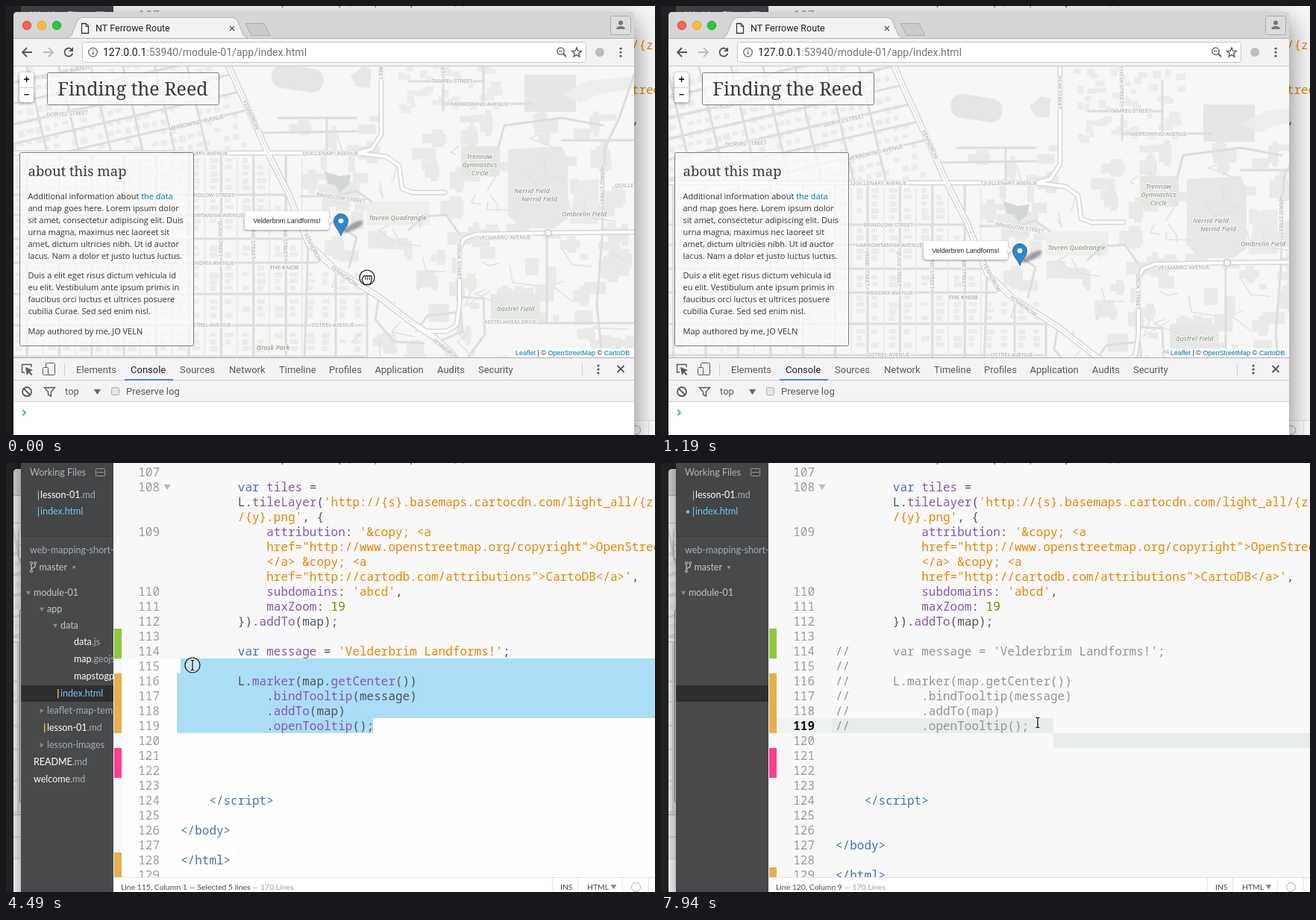
Animation, 870 px wide and 575 px high, one loop 8 s. Source, as an HTML page with a canvas:

```html
<!DOCTYPE html>
<html lang="en">
<head>
<meta charset="utf-8">
<title>Map and editor</title>
<style>
html, body { margin: 0; width: 100%; height: 100%; overflow: hidden; background: #222; }
canvas { display: block; }
</style>
</head>
<body>
<canvas id="stage" width="870" height="575"></canvas>
<script>
const LOOP = 8000;
const MONO = '"Noto Sans Mono", monospace', UI = 'Roboto, sans-serif', SIDE = 'Lato, sans-serif';
const BODY = '"Open Sans", sans-serif', SERIF = '"Noto Serif", serif', ARIAL = '"Liberation Sans", sans-serif';
const stage = document.getElementById('stage').getContext('2d');
let g = stage;

// ---------- drawing helpers ----------
function rect(x, y, w, h, color) { g.fillStyle = color; g.fillRect(x, y, w, h); }
function rounded(x, y, w, h, r, fill, stroke) {
  g.beginPath(); g.roundRect(x, y, w, h, r); paint(fill, stroke);
}
function paint(fill, stroke, width = 1) {
  if (fill) { g.fillStyle = fill; g.fill(); }
  if (stroke) { g.strokeStyle = stroke; g.lineWidth = width; g.stroke(); }
}
function circle(x, y, r, fill, stroke, width) {
  g.beginPath(); g.arc(x, y, r, 0, 7); paint(fill, stroke, width);
}
function path(p, close) {
  g.beginPath();
  for (let i = 0; i < p.length; i += 2) g.lineTo(p[i], p[i + 1]);
  if (close) g.closePath();
}
function line(p, color, width = 1) { path(p); paint(null, color, width); }
function poly(p, fill, stroke, width) { path(p, true); paint(fill, stroke, width); }
function text(s, x, y, font, color, align = 'left') {
  g.font = font; g.fillStyle = color; g.textAlign = align;
  g.fillText(s, x, y);
}
function run(parts, x, y, font) {
  for (const [s, color] of parts) { text(s, x, y, font, color); x += g.measureText(s).width; }
}
function triangle(x, y, r, color, right) {
  poly(right ? [x - r * .7, y - r, x + r * .8, y, x - r * .7, y + r]
             : [x - r, y - r * .7, x + r, y - r * .7, x, y + r * .9], color);
}
function shadow(color, blur, dy = 0) { g.shadowColor = color; g.shadowBlur = blur; g.shadowOffsetY = dy; }
function noShadow() { shadow('transparent', 0); }
function clipped(x, y, w, h, draw) {
  g.save(); g.beginPath(); g.rect(x, y, w, h); g.clip(); draw(); g.restore();
}
const mix = (a, b, k) => a + (b - a) * k;
const ease = k => k * k * (3 - 2 * k);

// ---------- map ----------
const DIAGONAL = [276, 30, 297, 78, 328, 145, 350, 195, 378, 250, 405, 318, 440, 352, 500, 390, 545, 425, 575, 445, 615, 482];
const diagX = y => 296 + (y - 78) * .455;
const MAJOR = [
  DIAGONAL,
  [-50, 197, 470, 197, 490, 192, 503, 172, 503, 30],
  [470, 197, 510, 202, 527, 214, 531, 245, 545, 250, 588, 250],
  [842, 303, 735, 304, 630, 306, 614, 312, 608, 325, 608, 400, 604, 428, 590, 436, 560, 436]
];
const MINOR = [
  [365, 150, 470, 150], [340, 170, 470, 168], [430, 150, 430, 197],
  [586, 30, 586, 140], [540, 101, 640, 101], [586, 131, 705, 131], [640, 60, 640, 131],
  [842, 92, 822, 150, 803, 190, 799, 310, 792, 400, 800, 480], [745, 180, 842, 180],
  [660, 190, 668, 160, 745, 150, 800, 160], [608, 306, 590, 280, 560, 282, 540, 300],
  [395, 255, 440, 255, 470, 248, 490, 262], [440, 290, 470, 310, 460, 350],
  [608, 390, 640, 392, 642, 440, 620, 470], [640, 425, 842, 425], [725, 310, 725, 425],
  [550, 436, 565, 415, 610, 410, 612, 436, 580, 450], [500, 390, 495, 420, 520, 450, 560, 452],
  [405, 318, 400, 480], [442, 355, 442, 480], [484, 385, 484, 480]
];
const STREETS = [
  ['TOLANDRE AVENUE', 80, 88, -13], ['DORVEL STREET', 82, 144, -3], ['DORVEL STREET', 213, 113, -13],
  ['MERROWIND AVENUE', 255, 156, -13], ['QUILLENARY AVENUE', 435, 200, 0], ['QUILLENARY AVENUE', 260, 200, 0],
  ['BRINDLOW STREET', 273, 256, 0], ['BRINDLOW STREET', 449, 257, 8], ['HARROWTANNIA AVENUE', 274, 283, 0],
  ['WENDRIX AVENUE', 274, 347, 0], ['OSTREL AVENUE', 273, 430, 0], ['OSTREL AVENUE', 438, 430, 0],
  ['VELMARRO AVENUE', 669, 310, -1], ['KESTELHOLM DRIVE', 676, 426, 0], ['TAMREL STREET', 598, 103, 0],
  ['MERROWIND AVENUE', 635, 134, 0], ['FENNDROW', 329, 146, 65], ['FENNDROW', 412, 324, 62],
  ['FENNDROW', 454, 362, 36], ['FENNDROW', 590, 460, 38], ['VEMB STREET', 245, 312, 90],
  ['QUOL STREET', 288, 312, 90], ['WUND STREET', 332, 314, 90], ['SNEB STREET', 375, 314, 90],
  ['PLIM STREET', 503, 76, 90], ['DROK STREET', 608, 343, 90], ['HESK STREET', 586, 68, 90],
  ['NERRID STREET', 800, 240, 90], ['QUILLENARY AVE', 846, 243, 0]
];
const PLACES = [
  ['Tavren Quadrangle', 525, 287], ['Trennow', 635, 205], ['Gymnastics', 635, 216], ['Circle', 635, 227],
  ['Nerrid Field', 705, 251], ['Nerrid Field', 715, 262], ['Ombrelin Field', 775, 282],
  ['Gastrel Field', 683, 409], ['Grosk Park', 358, 461]
];

function buildMap() {
  const c = document.createElement('canvas');
  c.width = 910; c.height = 455;
  g = c.getContext('2d');
  g.translate(50, -30);
  g.lineJoin = g.lineCap = 'round';
  let seed = 11;
  const rnd = () => (seed = (seed * 16807) % 2147483647) / 2147483647;
  const HOUSE = '#ebebea', ROAD = '#dcdede';
  rect(-50, 30, 910, 455, '#f6f6f4');

  // houses along the regular blocks
  const vx = i => -15.4 + 43.4 * i, rows = [197, 253, 280, 312, 344, 386, 428, 470];
  for (let i = 0; i < 12; i++)
    for (let y = 204; y < 484; y += 9)
      for (const side of [-15, 5]) {
        const x = vx(i) + side, w = 7 + rnd() * 5, h = 5 + rnd() * 3;
        if (rows.some(r => Math.abs(r - y - 3) < 7) || (y < 350 && x > diagX(y) - 18) || rnd() < .12) continue;
        rect(x, y, w, h, HOUSE);
      }
  // tilted quarter north of the avenue
  clipped(-50, 30, 900, 164, () => {
    for (let c = 60; c < 270; c += 14)
      for (let x = -45; x < 320; x += 12) {
        const y = c - .23 * x;
        if (x > diagX(y) - 18 || rnd() < .2) continue;
        g.save(); g.translate(x, y); g.rotate(-.22);
        rect(0, 0, 6 + rnd() * 4, 5 + rnd() * 4, HOUSE);
        g.restore();
      }
    for (const c of [77, 105, 133, 161, 187, 214]) {
      const end = (260.5 + .455 * c) / 1.105;
      line([-50, c + 11.5, end, c - .23 * end], ROAD, 3);
    }
    for (let x = -70; x < 270; x += 43) line([x, 30, x + 39, 197], ROAD, 3);
  });
  // larger buildings of the eastern part
  for (let i = 0; i < 150; i++) {
    const x = 350 + rnd() * 470, y = 140 + rnd() * 330, w = 8 + rnd() * 24, h = 7 + rnd() * 18;
    if (x < diagX(y) + 20 || (x > 480 && x < 575 && y > 262 && y < 300) || (x < 545 && y > 350 && y < 440)) continue;
    rect(x, y, w, h, '#e9e9e8');
    if (rnd() < .5) rect(x + w * .4, y - 6, w * .5, h + 11, '#e9e9e8');
  }
  for (let i = 0; i < 60; i++) rect(520 + rnd() * 140, 40 + rnd() * 95, 6 + rnd() * 8, 6 + rnd() * 5, HOUSE);
  // sports grounds and pond
  g.save(); g.translate(391, 97); g.rotate(.15); rounded(-35, -16, 70, 32, 15, '#e4e5e4'); g.restore();
  poly([462, 94, 478, 81, 490, 84, 488, 110, 470, 108], '#e6e7e6');
  rect(695, 92, 69, 50, '#e5e6e5');
  poly([673, 192, 745, 188, 753, 205, 753, 285, 735, 298, 690, 298, 673, 280], '#e6e7e6');
  poly([765, 235, 795, 232, 794, 292, 755, 292], '#eaebea');
  rect(650, 386, 66, 34, '#e5e8e5');
  rect(610, 188, 52, 40, '#e6e6e5');
  rect(484, 262, 84, 32, '#eeefed');
  poly([427, 222, 446, 228, 462, 226, 459, 240, 447, 250, 441, 240, 432, 238], '#d3d7d8');
  poly([745, 118, 780, 100, 842, 95, 842, 110, 790, 120, 770, 130], '#eceded');

  for (const r of rows.slice(1)) line([-50, r, r < 345 ? diagX(r) : 480, r], ROAD, 3);
  for (let i = 0; i < 10; i++) {
    line([vx(i), 197, vx(i), 485], ROAD, 3.4);
    line([vx(i) + 21.5, 204, vx(i) + 21.5, 485], '#e6e7e7', 1.4);
  }
  for (const p of MINOR) line(p, ROAD, 3);
  for (let i = 0; i < 34; i++) {
    const x = 440 + rnd() * 370, y = 150 + rnd() * 300;
    line([x, y, x + rnd() * 30 - 15, y + rnd() * 24, x + rnd() * 50 - 10, y + rnd() * 30], '#e0e2e2', 1.6);
  }
  for (const p of MAJOR) line(p, '#d5d8d8', p === DIAGONAL ? 9 : 7);
  for (const p of MAJOR) line(p, '#fbfbfa', p === DIAGONAL ? 6 : 4);
  line(DIAGONAL.slice(0, 18), '#d8dada', 1);
  circle(727, 304, 4.5, '#f8f8f7', '#d0d3d3', 2);

  const label = (s, x, y, deg, font, color) => {
    g.save(); g.translate(x, y); g.rotate(deg * Math.PI / 180);
    g.font = font; g.textAlign = 'center'; g.strokeStyle = '#f6f6f4'; g.lineWidth = 2.5;
    g.strokeText(s, 0, deg ? 3 : 0);
    text(s, 0, deg ? 3 : 0, font, color, 'center');
    g.restore();
  };
  for (const [s, x, y, deg] of STREETS) label(s, x, y, deg, '7.5px ' + BODY, '#a2a4a4');
  for (const [s, x, y] of PLACES) label(s, x, y, 0, 'italic 600 9px ' + BODY, '#91a497');
  label('THE KNOB', 373, 353, 0, '8px ' + BODY, '#87919a');
  g = stage;
  return c;
}
const mapImage = buildMap();

// ---------- browser ----------
function panStep(t) { return t < 150 ? -1 : Math.min(7, Math.floor((t - 150) / 148.5)); }
function panAt(k) {
  if (k < 2) return [10 * (k + 1), Math.round(13.5 * (k + 1))];
  const done = 1 - Math.pow(.5, k - 1);
  return [20 + Math.round(12 * done), 27 + Math.round(13 * done)];
}

function drawMarker(x, y) {
  g.save();
  g.translate(x + 1, y); g.transform(1, 0, -.75, .55, 0, 0);
  g.filter = 'blur(1.5px)';
  g.beginPath(); g.ellipse(0, -20, 8, 15, 0, 0, 7); paint('rgba(0,0,0,.33)');
  g.restore();
  const tip = y + 1, cy = y - 19;
  g.beginPath();
  g.moveTo(x, tip);
  g.bezierCurveTo(x - 3, tip - 9, x - 9.5, cy + 8, x - 9.5, cy);
  g.arc(x, cy, 9.5, Math.PI, 0);
  g.bezierCurveTo(x + 9.5, cy + 8, x + 3, tip - 9, x, tip);
  paint('#2f86c8', '#2a6fa5');
  circle(x, cy, 3.3, '#fff');
}
function drawTooltip(x, y) {
  shadow('rgba(0,0,0,.4)', 3, 1);
  rounded(x, y, 113, 25, 3, '#fff');
  poly([x + 113, y + 8, x + 118, y + 12.5, x + 113, y + 17], '#fff');
  noShadow();
  text('Velderbrim Landforms!', x + 56.5, y + 16, '9px ' + ARIAL, '#222', 'center');
}
function drawHand(x, y, pressed) {
  if (pressed) circle(x, y, 10, 'rgba(255,255,255,.55)', '#111', 1.2);
  g.beginPath();
  g.moveTo(x - 4, y + 9); g.lineTo(x - 7, y + 3); g.lineTo(x - 5, y - 1);
  for (let i = 0; i < 4; i++) g.arc(x - 3.5 + i * 2.8, y - 1, 1.4, Math.PI, 0);
  g.lineTo(x + 6, y + 4); g.lineTo(x + 4, y + 9); g.closePath();
  paint('#fff', '#111', 1.2);
  for (let i = 0; i < 3; i++) line([x - 2 + i * 2.8, y, x - 2 + i * 2.8, y + 3], '#111', 1);
}

const ABOUT = [
  [275, 'and map goes here. Lorem ipsum dolor'], [291, 'sit amet, consectetur adipiscing elit. Duis'],
  [307, 'urna magna, maximus nec laoreet sit'], [323, 'amet, dictum ultricies nibh. Ut id auctor'],
  [339, 'lacus. Nam a dolor et justo luctus luctus.'], [365, 'Duis a elit eget risus dictum vehicula id'],
  [381, 'eu elit. Vestibulum ante ipsum primis in'], [397, 'faucibus orci luctus et ultrices posuere'],
  [413, 'cubilia Curae. Sed sed enim nisl.'], [440, 'Map authored by me, JO VELN']
];

function drawPage(t) {
  const k = panStep(t), [dx, dy] = panAt(k);
  g.drawImage(mapImage, dx - 50, dy + 30);
  drawMarker(449 + dx, 307 + dy);
  drawTooltip(320 + dx, 275 + dy);

  shadow('rgba(0,0,0,.45)', 4, 1);
  rounded(18, 89, 19, 40, 3, '#fff');
  noShadow();
  rect(18, 109, 19, 1, '#ccc');
  text('+', 27.5, 103, 'bold 14px ' + ARIAL, '#111', 'center');
  text('−', 27.5, 123, 'bold 13px ' + ARIAL, '#111', 'center');

  rounded(55.5, 89.5, 230, 43, 2, 'rgba(250,250,250,.75)', '#7d7d7d');
  text('Finding the Reed', 170, 120, '25px ' + SERIF, '#3a3a3a', 'center');
  rounded(18.5, 196.5, 233, 259, 2, 'rgba(250,250,250,.75)', '#7d7d7d');
  text('about this map', 29.5, 228, '18.5px ' + SERIF, '#3a3a3a');
  const font = '11px ' + BODY;
  run([['Additional information about ', '#333'], ['the data', '#0a72bd']], 29.5, 259, font);
  for (const [y, s] of ABOUT) text(s, 29.5, y, font, '#333');

  rect(681, 459, 161, 12, 'rgba(255,255,255,.75)');
  const link = '#0078a8';
  run([['Leaflet', link], [' | © ', '#333'], ['OpenStreetMap', link], [' © ', '#333'], ['CartoDB', link]],
    683, 468, '9px ' + ARIAL);
  if (k < 5) {
    const [hx, hy] = panAt(Math.min(k, 1));
    drawHand(484 + hx, 364 + hy, k < 2);
  }
}

function drawChrome() {
  rect(10, 8, 832, 36, '#d5d5d5');
  [['#ff5f57', '#e14640'], ['#ffbd2e', '#dfa023'], ['#28c940', '#1dad2b']].forEach(([fill, edge], i) =>
    circle(28 + 20 * i, 26, 5.7, fill, edge));
  poly([82, 43.5, 88, 39, 96, 19, 101, 15.5, 305, 15.5, 310, 19, 318, 39, 324, 43.5], '#f2f2f2', '#b3b3b3');
  rect(10, 43, 72, 1, '#b3b3b3'); rect(324, 43, 518, 1, '#b3b3b3');
  rect(10, 44, 832, 37, '#f2f2f2');
  rect(10, 80, 832, 1, '#c8c8c8');
  poly([321, 23.5, 346, 23.5, 354, 39.5, 329, 39.5], '#cbcbcb', '#aaa');
  poly([101.5, 23.5, 107, 23.5, 110.5, 27, 110.5, 36.5, 101.5, 36.5], '#fff', '#333', 1.3);
  line([107, 23.5, 107, 27.5, 110.5, 27.5], '#333');
  text('NT Ferrowe Route', 120, 34, '12.5px ' + UI, '#222');
  line([300, 27, 306, 33], '#555', 1.3); line([306, 27, 300, 33], '#555', 1.3);
  rounded(810.5, 13.5, 27, 25, 3, '#dcdcdc', '#aaa');
  circle(824, 22.5, 3, '#777');
  g.beginPath(); g.ellipse(824, 31, 6, 4, 0, Math.PI, 0); paint('#777');

  line([35, 62, 22, 62], '#555', 1.8); line([28, 56, 22, 62, 28, 68], '#555', 1.8);
  line([50, 62, 62, 62], '#bbb', 1.8); line([57, 56, 63, 62, 57, 68], '#bbb', 1.8);
  g.beginPath(); g.arc(84, 62, 5.5, .3, 5.5); paint(null, '#555', 1.8);
  poly([90, 55, 90, 61, 84, 61], '#555');
  rounded(102.5, 48.5, 675, 27, 3, '#fff', '#c6c6c6');
  circle(116.5, 62, 5.8, null, '#666', 1.3);
  rect(116, 61, 1.4, 4, '#666'); rect(116, 58.5, 1.4, 1.4, '#666');
  run([['127.0.0.1', '#222'], [':53940/module-01/app/index.html', '#757575']], 130, 67, '14px ' + UI);
  circle(743.5, 60.5, 4.6, null, '#555', 1.4); line([747, 64, 751, 68], '#555', 1.8);
  line([741, 60.5, 746, 60.5], '#555');
  const star = [];
  for (let i = 0; i < 10; i++) {
    const r = i % 2 ? 2.9 : 6.8, a = i * Math.PI / 5;
    star.push(765 + r * Math.sin(a), 62.5 - r * Math.cos(a));
  }
  poly(star, null, '#555', 1.3);
  circle(796, 62, 6, '#bdbdbd');
  for (const y of [57, 62, 67]) circle(824, y, 1.6, '#555');
}

function drawDevtools() {
  rect(10, 471, 832, 104, '#f3f3f3');
  rect(10, 471, 832, 1, '#b0b0b0');
  rect(10, 501, 832, 1, '#ccc');
  rect(10, 531, 832, 44, '#fff');
  rect(10, 530, 832, 1, '#d5d5d5');
  line([25, 491, 21.5, 491, 21.5, 480.5, 34, 480.5, 34, 484], '#5a5a5a', 1.4);
  poly([26, 484, 36, 488, 32, 490, 35.5, 494, 34, 495, 30.5, 491.5, 28, 495], '#5a5a5a');
  rounded(53.5, 478.5, 12, 16, 1, null, '#5a5a5a');
  rounded(49.5, 484.5, 7, 10, 1, '#f3f3f3', '#5a5a5a');
  rect(78, 479, 1, 16, '#ccc'); rect(772, 479, 1, 16, '#ccc');
  [['Elements', 94], ['Console', 167], ['Sources', 233], ['Network', 299], ['Timeline', 366], ['Profiles', 433],
    ['Application', 494.5], ['Audits', 578], ['Security', 633]].forEach(([s, x]) =>
    text(s, x, 492, '13px ' + UI, s === 'Console' ? '#222' : '#5a5a5a'));
  rect(159, 500, 65, 2, '#4d83e6');
  for (const y of [482, 487, 492]) circle(794, y, 1.6, '#555');
  line([819.5, 482, 828.5, 491], '#555', 1.8); line([828.5, 482, 819.5, 491], '#555', 1.8);
  circle(28, 517, 6, null, '#5a5a5a', 1.8); line([24, 513, 32, 521], '#5a5a5a', 1.8);
  poly([51.5, 511.5, 65.5, 511.5, 60.5, 517, 60.5, 523, 56.5, 521, 56.5, 517], null, '#5a5a5a', 1.4);
  text('top', 79, 521, '13px ' + UI, '#5a5a5a');
  triangle(122.5, 517, 4.5, '#666');
  rounded(141.5, 511.5, 10, 10, 2, '#e6e6e6', '#aaa');
  text('Preserve log', 161, 521, '13px ' + UI, '#5a5a5a');
  line([22.5, 541.5, 26, 545, 22.5, 548.5], '#3f80ea', 1.6);
}

function drawBrowser(t, front) {
  if (front) shadow('rgba(0,0,0,.5)', 36, 12);
  rounded(10, 8, 832, 590, [5, 5, 0, 0], '#d5d5d5');
  noShadow();
  g.save(); g.beginPath(); g.roundRect(10, 8, 832, 590, [5, 5, 0, 0]); g.clip();
  drawChrome();
  clipped(10, 81, 832, 390, () => drawPage(t));
  drawDevtools();
  g.restore();
}

// ---------- editor ----------
const INK = { t: '#535353', b: '#446fbd', p: '#8757ad', o: '#e88501', n: '#6d8600' };
const I8 = ' '.repeat(8), I12 = ' '.repeat(12);
const CW = 9.6, LEFT = 234, COMMENT = '#949494';
// ~x switches to colour x; the first item is the line number
const CODE = [
  [106, I8 + "~bvar ~pmap ~t= L.~pmap~t(~o'map'~t, options);"], [107, ''], [108, I8 + '~bvar ~ptiles ~t='],
  [0, I8 + "~tL.~ptileLayer~t(~o'http://{s}.basemaps.cartocdn.com/light_all/{z}/{x}"], [0, I8 + "~o/{y}.png'~t, {"],
  [109, I12 + "~pattribution~t: ~o'&copy; <a"], [0, I12 + '~ohref="http://www.openstreetmap.org/copyright">OpenStreetMap'],
  [0, I12 + '~o</a> &copy; <a'], [0, I12 + "~ohref=\"http://cartodb.com/attributions\">CartoDB</a>'~t,"],
  [110, I12 + "~psubdomains~t: ~o'abcd'~t,"], [111, I12 + '~pmaxZoom~t: ~n19'], [112, I8 + '~t}).~paddTo~t(map);'], [113, ''],
  [114, I8 + "~bvar ~pmessage ~t= ~o'Velderbrim Landforms!'~t;"], [115, ''], [116, I8 + '~tL.~pmarker~t(map.~pgetCenter~t())'],
  [117, I12 + '~t.~pbindTooltip~t(message)'], [118, I12 + '~t.~paddTo~t(map)'], [119, I12 + '~t.~popenTooltip~t();'],
  [120, ''], [121, ''], [122, ''], [123, ''], [124, '    ~b</script' + '>'], [125, ''], [126, '~b</body>'], [127, ''],
  [128, '~b</html>'], [129, '']
];
const rowTop = n => 262 + (n - 115) * 20;

function codeRow(src, y, commented) {
  if (commented) {
    const plain = '//' + src.replace(/~./g, '').slice(2);
    return text(plain, LEFT, y, '500 16px ' + MONO, COMMENT);
  }
  let col = 0;
  for (const part of src.split('~')) {
    const color = INK[part[0]], s = color ? part.slice(1) : part;
    text(s, LEFT + col * CW, y, '500 16px ' + MONO, color || INK.t);
    col += s.length;
  }
}

// everything the editor shows at a given time
function editorState(t) {
  const s = { commented: t >= 5840, added: t >= 7940, status: 'Line 119, Column 28', active: t >= 2240 };
  const progress = (from, steps) => ease(Math.min(1, (Math.floor((t - from + 1) / 149.5) + 1) / steps));
  if (t >= 2240 && t < 3590) {
    s.caret = (t - 2240) % 1050 < 600 || t >= 3290;
    if (t >= 2540) {
      const k = progress(2540, 7);
      s.mouse = [mix(880, 499, k), mix(425, 352, k), 'beam'];
    }
  } else if (t >= 3590 && t < 4640) {
    const k = progress(3590, 7), x = mix(492, 250, k), y = mix(352, 271, k);
    const head = Math.max(115, 115 + Math.floor((y - 262) / 20));
    const col = head === 115 ? 0 : Math.round((Math.min(x, 492) - LEFT) / CW);
    s.mouse = [x, y, 'beam', true];
    s.select = [head, LEFT + col * CW];
    s.status = `Line ${head}, Column ${col + 1}`;
    s.picked = head < 119 ? ` — Selected ${120 - head} lines` : ` — Selected ${Math.max(1, 27 - col)} columns`;
    s.white = 262;
  } else if (t >= 4640 && t < 7190) {
    s.select = [114, 229];
    s.status = 'Line 114, Column 1';
    s.picked = ' — Selected 6 lines';
    s.fold = t >= 5090;
    s.white = t < 6590 ? 262 : 326;
    if (t < 4790) s.mouse = [237, 256, 'beam', true];
    else if (t < 5090) s.mouse = [191, 250, 'arrow'];
    else if (t >= 6590) {
      const k = progress(6590, 4);
      s.mouse = [mix(215, 505, k), mix(262, 348, k), 'beam'];
    }
  } else if (t >= 7190) {
    s.mouse = [505, 348, 'beam', t < 7340];
    s.caret = t < 7640;
    s.split = true;
    if (s.added) s.status = 'Line 120, Column 9';
  }
  s.active = s.active && !s.select;
  return s;
}

function drawMouse([x, y, kind, pressed]) {
  x = Math.round(x); y = Math.round(y);
  if (pressed) circle(x, y, 10, 'rgba(255,255,255,.3)', '#111', 1.2);
  if (kind === 'arrow')
    return poly([x, y, x, y + 15, x + 3.5, y + 12, x + 6, y + 17, x + 8, y + 16, x + 6, y + 11, x + 10.5, y + 11], '#111', '#fff');
  const beam = [x - 2.5, y - 7, x, y - 6, x, y + 6, x - 2.5, y + 7, x, y + 6, x + 2.5, y + 7, x, y + 6, x, y - 6, x + 2.5, y - 7];
  line(beam, 'rgba(255,255,255,.8)', 3);
  line(beam, '#111', 1.3);
}

function drawCode(s) {
  rect(144, 0, 726, 575, '#f8f8f8');
  if (s.white) rect(155, s.white, 715, 555 - s.white, '#fefefe');
  if (s.active) {
    rect(155, 342, 74, 20, '#eff2f2');
    rect(229, 342, s.split ? 297 : 641, 20, '#e7ecec');
    if (s.split) rect(526, 362, 344, 20, '#e7ecec');
  }
  if (s.select) {
    const [head, x] = s.select;
    for (let n = head; n <= 119; n++) {
      const from = n === head ? x : 229;
      rect(from, rowTop(n), (n === 119 ? 492 : 870) - from, 20, '#abddf7');
    }
  }
  [['#8dc93d', 222, 40], ['#e5b04f', 282, 80], ['#ff3f8e', 382, 40],
    ['#e5b04f', s.added ? 542 : 522, 40]].forEach(([c, y, h]) => rect(145, y, 10, h, c));
  CODE.forEach(([n, src], i) => {
    const y = 20 * i - 2, bold = s.active && n === 119;
    if (n) text(n, 206, y, (bold ? '700' : '500') + ' 16px ' + MONO, bold ? '#111' : '#9b9b9b', 'right');
    codeRow(src, s.added && n >= 126 ? y + 20 : y, s.commented && n >= 114 && n <= 119);
  });
  triangle(216, 32, 4.5, '#b9b9b9');
  if (s.fold) triangle(216, 252, 4.5, '#b9b9b9');
  if (s.caret) rect(492, 342, 1, 20, '#000');
}

function drawStatus(s) {
  rect(144, 555, 726, 20, '#fff');
  rect(144, 555, 726, 1, '#e0e0e0');
  const font = '10.4px ' + SIDE;
  run([[s.status + (s.picked || ''), '#454545'], [' — 170 Lines', '#a0a0a0']], 154, 572, font);
  for (const x of [732, 766, 826, 861]) rect(x, 556, 1, 19, '#e4e4e4');
  text('INS', 743, 572, font, '#454545');
  text('HTML', 779, 572, font, '#454545');
  triangle(814.5, 568, 4, '#888');
  circle(844.5, 568.5, 6, null, '#aaa');
}

function drawSidebar(s) {
  const font = '12.5px ' + SIDE, white = '#fff', dim = '#aaadaf', blue = '#78c4f0', bar = '#e5b04f';
  const file = (name, ext, x, y) => run([[name, white], [ext, dim]], x, y + 4, font);
  rect(20, 0, 124, 575, '#47494b');
  rect(20, 0, 124, 98, '#434547');
  rect(20, 98, 124, 1, '#393b3c');
  text('Working Files', 32, 17, font, '#b4b6b8');
  rounded(120.5, 7.5, 12, 10, 1, null, '#999');
  line([122, 12.5, 131, 12.5], '#999');
  rect(43, 37, 1, 13, '#b9b9b9'); rect(43, 59, 1, 13, blue);
  file('lesson-01', '.md', 46, 43);
  text('index.html', 46, 69, font, blue);
  if (s.commented) circle(36, 65.5, 2.3, '#aaa');
  text('web-mapping-short-course', 32, 121, font, dim);
  line([34, 135, 34, 144], '#c4c6c7', 1.2); line([34, 142, 39, 139, 39, 135], '#c4c6c7', 1.2);
  for (const [x, y] of [[34, 134], [34, 145], [39, 134]]) circle(x, y, 1.6, '#47494b', '#c4c6c7');
  text('master', 44.5, 144, font, '#c4c6c7');
  triangle(91, 140, 2.5, '#999');
  triangle(30, 174, 3.2, '#858789');
  text('module-01', 37, 178, font, '#c4c6c7');
  rect(20, 298, 124, 22, '#2d2e30');
  if (s.added) return;
  triangle(48, 196, 3.2, '#858789'); text('app', 55, 200, font, '#c4c6c7');
  triangle(66, 218, 3.2, '#858789'); text('data', 73, 222, font, '#c4c6c7');
  file('data', '.js', 91, 240);
  file('map', '.geojson', 91, 263);
  file('mapstogpx', '.js', 91, 286);
  rect(69, 303, 1.5, 12, bar);
  text('index.html', 73, 313, font, blue);
  triangle(48, 332, 3.2, '#858789', true); text('leaflet-map-template', 55, 336, font, dim);
  rect(51, 349, 1.5, 12, bar);
  file('lesson-01', '.md', 55, 355);
  triangle(48, 378, 3.2, '#858789', true); text('lesson-images', 55, 382, font, dim);
  file('README', '.md', 37, 401);
  file('welcome', '.md', 37, 424);
}

function drawEditor(t, front) {
  const s = editorState(t);
  if (front) shadow('rgba(0,0,0,.45)', 22);
  rect(20, -10, 900, 620, '#47494b');
  noShadow();
  clipped(20, 0, 124, 575, () => drawSidebar(s));
  clipped(144, 0, 726, 555, () => drawCode(s));
  drawStatus(s);
  if (s.mouse) drawMouse(s.mouse);
}

// ---------- loop ----------
function frame() {
  const t = performance.now() % LOOP, browsing = t < 2240;
  rect(0, 0, 870, 575, '#232323');
  if (browsing) { drawEditor(t, false); drawBrowser(t, true); }
  else { drawBrowser(t, false); drawEditor(t, true); }
  requestAnimationFrame(frame);
}
frame();
</script>
</body>
</html>
```
